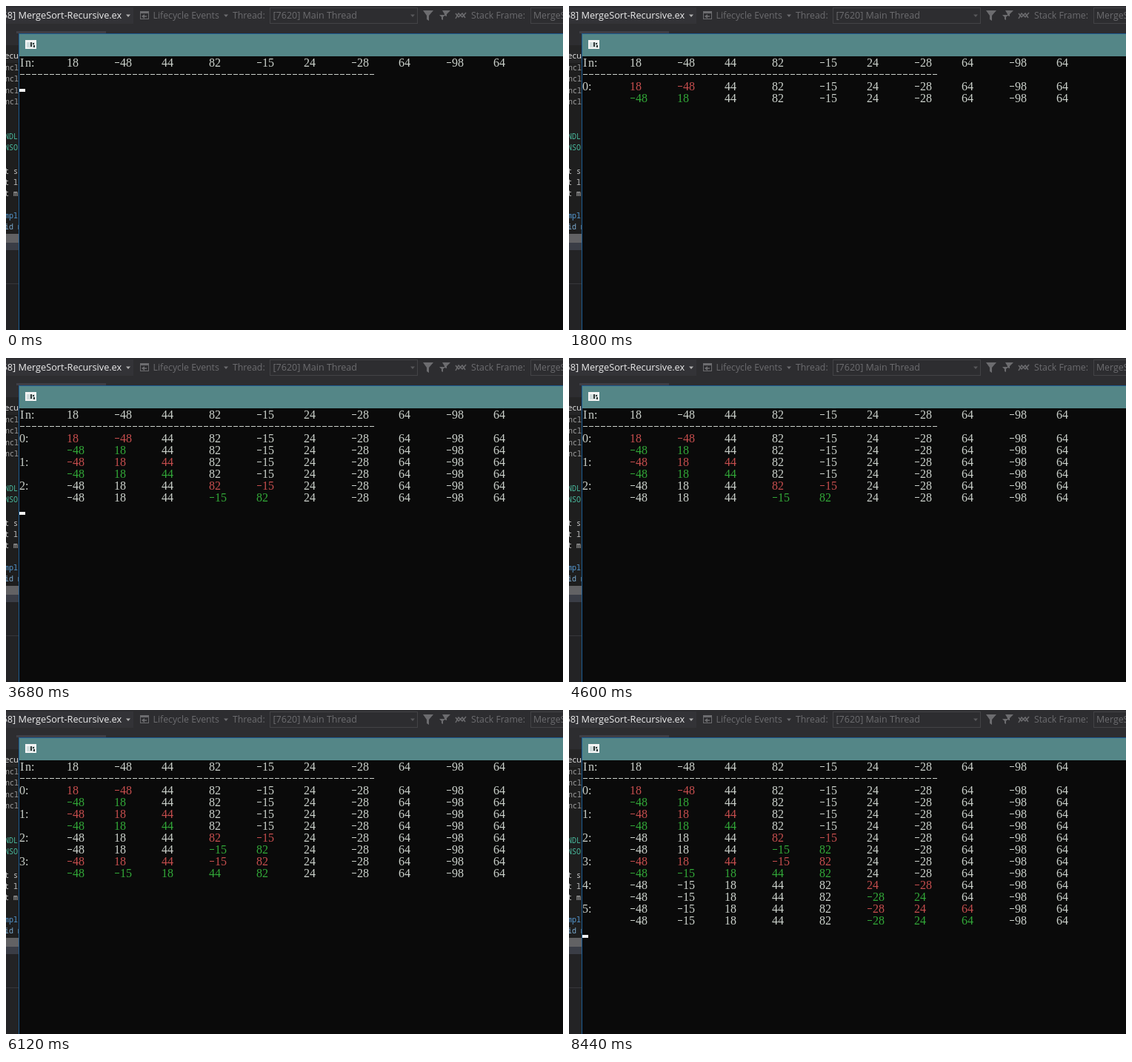
Recreate the animation shown at these times as an HTML page with a canvas. Size 752x438 px, loop 8.48 s.

```html
<!DOCTYPE html>
<html lang="en">
<head>
<meta charset="utf-8">
<title>Merge sort console</title>
<style>
html, body { margin: 0; width: 100%; height: 100%; overflow: hidden; background: #2d2d30; }
canvas { display: block; }
</style>
</head>
<body>
<canvas id="stage" width="752" height="438"></canvas>
<script>
const ctx = document.getElementById('stage').getContext('2d');
const LOOP = 8480, FIRST_STEP = 900, STEP = 1333, BLINK = 707;
const ui = size => size + 'px "Open Sans", "Noto Sans", sans-serif';
const CODE = '10px "Noto Sans Mono", "DejaVu Sans Mono", monospace';
const CONSOLE = '16px "Liberation Serif", "Noto Serif", serif';
const WHITE = '#ccd2cc', RED = '#c64e4e', GREEN = '#32a838';
const input = [18, -48, 44, 82, -15, 24, -28, 64, -98, 64];

function mergeSteps(values) {
  const list = values.slice(), steps = [];
  (function sort(from, to) {
    if (from >= to) return;
    const mid = (from + to) >> 1;
    sort(from, mid);
    sort(mid + 1, to);
    const before = list.slice();
    const part = list.slice(from, to + 1).sort((a, b) => a - b);
    list.splice(from, part.length, ...part);
    steps.push({ from, to, before, after: list.slice() });
  })(0, list.length - 1);
  return steps;
}
const steps = mergeSteps(input);

function box(x, y, w, h, color) {
  ctx.fillStyle = color;
  ctx.fillRect(x, y, w, h);
}

function text(str, x, y, color, font = ui(12.3)) {
  ctx.font = font;
  ctx.fillStyle = color;
  ctx.fillText(str, x, y);
}

function shape(color, ...points) {
  ctx.fillStyle = color;
  ctx.beginPath();
  for (let i = 0; i < points.length; i += 2) ctx.lineTo(points[i], points[i + 1]);
  ctx.fill();
}

function arrow(x, y, color) {
  shape(color, x - 3, y - 1.5, x + 3, y - 1.5, x, y + 2);
}

function line(color, width, ...points) {
  ctx.strokeStyle = color;
  ctx.lineWidth = width;
  ctx.beginPath();
  for (let i = 0; i < points.length; i += 2) ctx.lineTo(points[i], points[i + 1]);
  ctx.stroke();
}

function frame(x, y, w, h, color) {
  ctx.strokeStyle = color;
  ctx.lineWidth = 1;
  ctx.strokeRect(x + .5, y + .5, w - 1, h - 1);
}

function toolbar() {
  const dim = '#6c6c6f';
  box(0, 0, 752, 438, '#2d2d30');
  box(0, 2, 172, 22, '#333337');
  text('58] MergeSort-Recursive.ex', -5.5, 17, '#ededed', ui(12.7));
  arrow(165, 13, '#b0b0b0');

  frame(181, 7, 12, 11, dim);
  box(181, 7, 12, 3, dim);
  line(dim, 1.5, 190, 14, 184, 14);
  shape(dim, 183, 14, 187, 11, 187, 17);
  text('Lifecycle Events', 198.5, 17, dim);
  arrow(297, 13, dim);
  text('Thread:', 306, 17, dim);
  frame(356, 2, 200, 22, '#434346');
  text('[7620] Main Thread', 360.5, 17, dim, ui(12.5));
  arrow(549, 13, '#58585b');

  shape(dim, 563, 6, 577, 6, 571, 13, 571, 20, 568, 18, 568, 13);
  shape(dim, 589, 6, 600, 6, 595, 11, 595, 14, 592, 13, 592, 11);
  shape(dim, 585, 12, 593, 12, 590, 15, 590, 19, 588, 18, 588, 15);
  line(dim, 1.5, 607, 17, 611, 10, 616, 15, 621, 9);
  line(dim, 1.5, 607, 10, 611, 15, 616, 10, 620, 16);
  text('Stack Frame:', 628, 17, dim);
  frame(708, 2, 60, 22, '#434346');
  text('MergeSort', 712, 17, dim);
}

function editor() {
  box(14, 34, 121, 3, '#3f3f46');
  box(0, 53, 17, 24, '#252526');
  text('ecu', -2, 71, '#e6e6e6', ui(11.5));
  box(0, 77, 17, 253, '#1e1e1e');
  for (const y of [87, 102, 118, 133]) text('ncl', -1, y, '#a0a0a0', CODE);
  [['NDL', 180, '#48b89c'], ['NSO', 195, '#48b89c'],
   ['t s', 227, '#c8c8c8'], ['t l', 242, '#c8c8c8'], ['t m', 257, '#c8c8c8'],
   ['mpl', 287, '#569cd6'], ['id m', 302, '#7cabd0']]
    .forEach(([str, y, color]) => text(str, -2, y, color, CODE));
  box(0, 308, 17, 12, '#626264');
  box(0, 320, 17, 10, '#3a3d46');
  box(0, 330, 17, 108, '#232325');
  box(0, 375, 17, 1, '#37373b');
}

function consoleWindow() {
  box(17, 37, 735, 401, '#1c5b91');
  box(18, 38, 734, 30, '#548687');
  box(18, 68, 734, 370, '#0a0a0a');
  box(26, 46, 15, 12, '#f4f4f4');
  box(28, 49, 11, 7, '#d0dcdc');
  box(33, 49, 2, 6, '#303838');
  box(36, 50, 2, 2, '#303838');
  box(37, 53, 2, 3, '#303838');
}

// Console text sits on a grid of 8 by 16 pixel cells.
function print(str, col, row, color = WHITE) {
  const top = 69 + row * 16;
  [...str].forEach((ch, i) => {
    const x = 18 + (col + i) * 8;
    if (ch === '-') box(x + 1, top + 7, 6, 1, color);
    else text(ch, x + (ch === 'I' ? 1 : 0), top + 13, color, CONSOLE);
  });
}

function printList(list, row, from, to, color) {
  list.forEach((n, i) =>
    print(String(n), 8 + i * 8, row, i >= from && i <= to ? color : WHITE));
}

function draw(t) {
  toolbar();
  editor();
  consoleWindow();
  print('In:', 0, 0);
  printList(input, 0);
  print('-'.repeat(60), 0, 1);

  const shown = Math.max(0, Math.floor((t - FIRST_STEP) / STEP) + 1);
  steps.slice(0, shown).forEach(({ from, to, before, after }, i) => {
    const row = 2 + i * 2;
    print(i + ':', 0, row);
    printList(before, row, from, to, RED);
    printList(after, row + 1, from, to, GREEN);
  });
  if ((t + 120) % BLINK < BLINK / 2) box(18, 112 + shown * 32, 8, 4, '#f2f2f2');
}

function tick() {
  draw(performance.now() % LOOP);
  requestAnimationFrame(tick);
}
tick();
</script>
</body>
</html>
```
